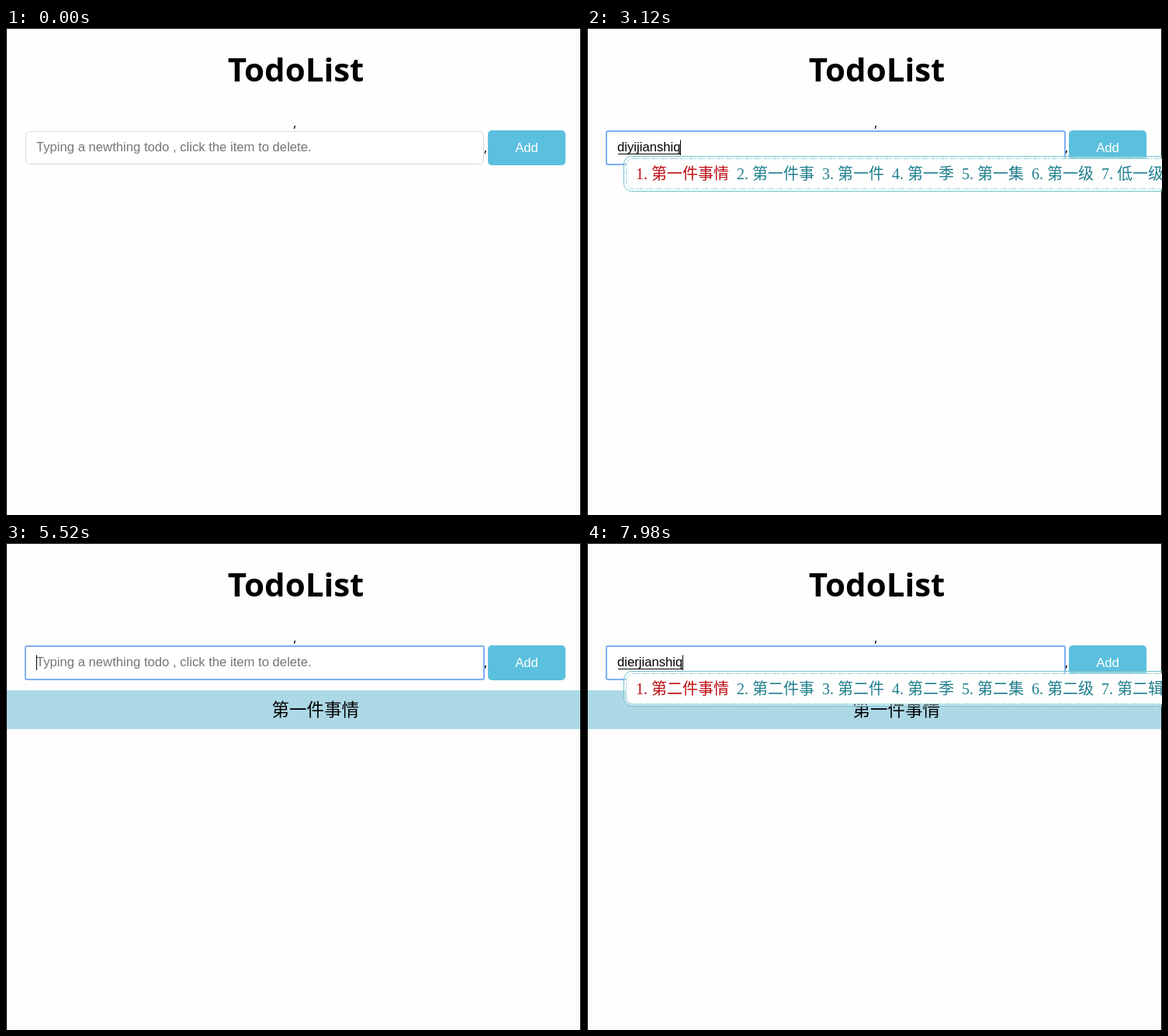
Recreate the animation shown at these times as an HTML page. Size 741x628 px, loop 8 s.

```html
<!DOCTYPE html>
<html lang="zh">
<head>
<meta charset="utf-8">
<title>TodoList</title>
<style>
  html, body { margin: 0; width: 100%; height: 100%; overflow: hidden; background: #fefefe; }
  svg { display: block; width: 100%; height: 100%; }
  text { white-space: pre; }
  .ui { font: 16.67px "Liberation Sans", "Noto Sans CJK SC", "Noto Sans CJK", sans-serif; }
  .title { font: bold 42px "Open Sans", sans-serif; text-anchor: middle; }
  .comma { font: 16.67px "Open Sans", sans-serif; }
  .task { font: 22.5px "Noto Sans CJK SC", "Noto Sans CJK", sans-serif; }
  .words { font: 20px "Liberation Serif", serif; fill: #1f7f8e; }
  .words .han { font-family: "Noto Sans CJK SC", "Noto Sans CJK", sans-serif; font-weight: 300; }
  .words .first { fill: #bd0d12; }
  .note { font: 14.5px Lato, sans-serif; fill: #7cc5cd; stroke: #7cc5cd; stroke-width: .3; }
</style>
</head>
<body>
<svg viewBox="0 0 741 628">
  <path d="M.5 628V.5H740.5V628" fill="none" stroke="#000"/>
  <text class="title" x="373.5" y="69">TodoList</text>
  <text class="comma" x="370.3" y="128">,</text>
  <text class="comma" x="616" y="160">,</text>

  <rect id="blurred" x="25.5" y="133.5" width="590" height="42" rx="5" fill="#fff" stroke="#d9d9d9"/>
  <rect id="focused" x="25" y="133" width="591" height="43" rx="2" fill="#fff" stroke="#7eaff2" stroke-width="2"/>
  <text id="hint" class="ui" x="39" y="159" fill="#757575">Typing a newthing todo , click the item to delete.</text>
  <text id="entry" class="ui" x="39"></text>
  <rect id="underline" x="40" y="162" height="1"/>
  <rect id="caret" width="1"/>

  <rect x="621" y="132" width="100" height="45" rx="5" fill="#5bc0de"/>
  <rect id="ring" x="620.5" y="131.5" width="101" height="46" rx="5" fill="none" stroke="#7eaff2"/>
  <text class="ui" x="671" y="160" fill="#fff" text-anchor="middle">Add</text>

  <g id="task">
    <rect x="1" y="190" width="739" height="50" fill="#add8e6"/>
    <text class="task" x="342.5" y="223">第一件事情</text>
  </g>

  <g id="popup">
    <rect id="outer" x="47.5" y="165.5" height="45" rx="10" fill="#fff" fill-opacity=".3" stroke="#75c1ca"/>
    <rect id="inner" x="50.5" y="168.5" height="39" rx="9" fill="#fefefe" stroke="#8fd0d7" stroke-dasharray="5 1 2 1 1 2"/>
    <text id="words" class="words" y="195"></text>
    <g id="badge">
      <path d="M-60 181.500L-67 188L-60 194.500ZM-57 181.500L-50 188L-57 194.500Z" fill="#1f7f8e"/>
      <g class="note">
        <text x="-47.500" y="182">Hello,</text>
        <text x="-47" y="193" font-size="11" style="font-size:11px">Mr.</text>
        <text x="-47" y="203.500">Right</text>
      </g>
    </g>
  </g>
</svg>
<script>
const LOOP = 8000, BLINK = 540, TEXT_X = 39, WORDS_X = 63;
const $ = id => document.getElementById(id);

const LISTS = {
  d: '的|都|到|大|点|得|大家',
  diy: '第一|低压|低于|地狱|抵押|地域|低音',
  diyi: '第一|第一次|第一个|低|地|底|抵',
  diyij: '第一季|第一集|第一级|第一届|第一句|低一级|第一',
  diyijian: '第一件|第一间|第一键|第一季|第一集|第一级|低一级',
  diyijianshiq: '第一件事情|第一件事|第一件|第一季|第一集|第一级|低一级',
  die: '爹|叠|蝶|跌|碟|谍|(┬＿┬)↘ 跌',
  dier: '第二|爹|叠|蝶|跌|碟|谍',
  dierj: '第二季|第二集|第二级|第二届|第二句|第二辑|第二',
  dierjian: '第二件|第二间|第二键|第二季|第二集|第二级|第二辑',
  dierjianshiq: '第二件事情|第二件事|第二件|第二季|第二集|第二级|第二辑'
};

// [time, entry text, candidate list, focus]
const STEPS = [
  [0, '', '', ''],
  [840, '', '', 'input'],
  [1740, 'd', '', 'input'],
  [1860, 'di', 'd', 'input'],
  [2040, 'di', 'diy', 'input'],
  [2160, 'diy', 'diy', 'input'],
  [2220, 'diyi', 'diyi', 'input'],
  [2400, 'diyij', 'diyi', 'input'],
  [2460, 'diyij', 'diyij', 'input'],
  [2520, 'diyiji', 'diyij', 'input'],
  [2580, 'diyijia', 'diyij', 'input'],
  [2640, 'diyijian', 'diyij', 'input'],
  [2700, 'diyijian', 'diyijian', 'input'],
  [2880, 'diyijians', 'diyijian', 'input'],
  [2940, 'diyijiansh', 'diyijian', 'input'],
  [3060, 'diyijianshi', 'diyijian', 'input'],
  [3120, 'diyijianshiq', 'diyijianshiq', 'input'],
  [3420, '第一件事情', '', 'input'],
  [4440, '第一件事情', '', 'input'],
  [4500, '第一件事情', '', ''],
  [4740, '', '', ''],
  [4980, '', '', 'button'],
  [5520, '', '', 'input'],
  [6240, 'd', '', 'input'],
  [6300, 'd', 'd', 'input'],
  [6420, 'di', 'd', 'input'],
  [6540, 'die', 'die', 'input'],
  [6720, 'dier', 'dier', 'input'],
  [7080, 'dierj', 'dier', 'input'],
  [7140, 'dierj', 'dierj', 'input'],
  [7200, 'dierji', 'dierj', 'input'],
  [7260, 'dierjia', 'dierj', 'input'],
  [7320, 'dierjian', 'dierj', 'input'],
  [7380, 'dierjian', 'dierjian', 'input'],
  [7680, 'dierjians', 'dierjian', 'input'],
  [7740, 'dierjiansh', 'dierjian', 'input'],
  [7800, 'dierjianshi', 'dierjian', 'input'],
  [7920, 'dierjianshiq', 'dierjian', 'input'],
  [7980, 'dierjianshiq', 'dierjianshiq', 'input']
];

const show = (id, visible) => $(id).style.display = visible ? '' : 'none';
const setX = (id, name, value) => $(id).setAttribute(name, value);

// Half-width characters take 10px, full-width ones 20px.
function drawPopup(list) {
  show('popup', list);
  if (!list) return;
  let x = WORDS_X, markup = '';
  LISTS[list].split('|').forEach((word, i) => {
    for (const char of `${i + 1}.${word}`) {
      const full = char > '~';
      markup += `<tspan x="${x}" class="${full ? 'han' : ''}${i ? '' : ' first'}">${char}</tspan>`;
      x += full ? 20 : 10;
    }
    x += 10;
  });
  $('words').innerHTML = markup;
  const right = Math.round(127 + (x - 10 - WORDS_X) * 16 / 15);
  setX('outer', 'width', right - 48);
  setX('inner', 'width', right - 54);
  setX('badge', 'transform', `translate(${right})`);
}

function drawStep([time, text, list, focus]) {
  const composing = /^[a-z]+$/.test(text);
  const committed = text && !composing;
  show('focused', focus === 'input');
  show('blurred', focus !== 'input');
  show('ring', focus === 'button');
  show('hint', !text);
  show('task', time >= 4740);
  $('entry').textContent = text;
  setX('entry', 'y', committed ? 161 : 159);
  const width = text ? Math.floor($('entry').getComputedTextLength()) : 0;
  show('underline', composing);
  setX('underline', 'width', Math.max(0, width - 1));
  setX('caret', 'x', TEXT_X + width);
  setX('caret', 'y', committed ? 146 : 144.5);
  setX('caret', 'height', committed ? 19 : 19.5);
  drawPopup(list);
}

let current;
function frame() {
  const time = performance.now() % LOOP;
  const step = STEPS.filter(s => s[0] <= time).pop();
  if (step !== current) drawStep(current = step);
  show('caret', step[3] === 'input' && (time - step[0]) % (2 * BLINK) < BLINK);
  requestAnimationFrame(frame);
}
frame();
</script>
</body>
</html>
```
